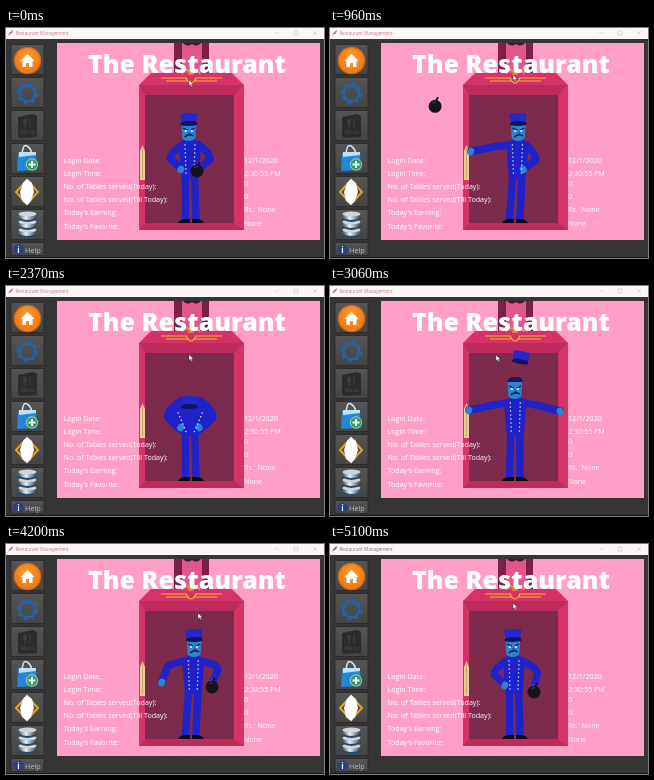
These frames come from a looping animation (318 px wide and 230 px high, 5130 ms). An HTML page:

```html
<!DOCTYPE html>
<html lang="en">
<head>
<meta charset="utf-8">
<title>Restaurant Management</title>
<style>
html, body { margin: 0; width: 100%; height: 100%; overflow: hidden; background: #353535; }
svg { display: block; width: 100vw; height: 100vh; }
text { font-family: "Open Sans", "Noto Sans", sans-serif; white-space: pre; }
.info { font-size: 7.15px; fill: #fff; }
.limb { fill: none; stroke: #1f22c9; stroke-linecap: round; stroke-linejoin: round; }
.dots { fill: none; stroke: #e9e6d2; stroke-width: 1.6; stroke-linecap: round; stroke-dasharray: 0 4; }
</style>
</head>
<body>
<svg viewBox="0 0 318 230" preserveAspectRatio="none">
  <defs>
    <clipPath id="panel"><rect x="51" y="15" width="263" height="197"/></clipPath>
    <linearGradient id="button" x2="0" y2="1"><stop stop-color="#555"/><stop offset="1" stop-color="#454545"/></linearGradient>
    <radialGradient id="orange" cy=".4"><stop stop-color="#ffa033"/><stop offset="1" stop-color="#f07c16"/></radialGradient>
    <linearGradient id="steel"><stop stop-color="#4c5258"/><stop offset=".4" stop-color="#eef0f1"/><stop offset="1" stop-color="#3c4248"/></linearGradient>
  </defs>
  <rect width="318" height="230" fill="#353535"/>
  <rect width="318" height="11" fill="#fdf6f6"/>
  <path d="M269 5h4M288 3h4v4h-4zM307 3l4 4M311 3l-4 4" fill="none" stroke="#cfbcbe" stroke-width=".6"/>
  <g id="caption">
    <path d="M2 8Q3 4 7 2Q7 6 3 7Z"/>
    <text x="9.5" y="7" font-size="4.6">Restaurant Management</text>
  </g>
  <g id="buttons" fill="url(#button)" stroke="#292929" stroke-width=".8"></g>

  <circle cx="21.5" cy="32.5" r="13.2" fill="url(#orange)" stroke="#c9691c" stroke-width="1.2"/>
  <path d="M14.5 33L21.5 26L28.5 33H26.5V39H23V35H20V39H16.500V33Z" fill="#fff"/>
  <g fill="none" stroke="#2364aa">
    <circle cx="21.5" cy="65.5" r="7.8" stroke-width="2.4"/>
    <circle cx="21.5" cy="65.5" r="9.8" stroke-width="2" stroke-dasharray="3.6 4.100"/>
  </g>
  <path d="M12 89L27 86L31 88V109L14 110L12 108Z" fill="#2b2b2b"/>
  <path d="M18 91v5m2-5v5m-1-5v9m5-9v8" stroke="#444" fill="none"/>
  <text x="14.500" y="106" font-size="5.4" fill="#4c4c4c">Menu</text>
  <path d="M16 127Q17 115 21 118Q25 120 26 127" fill="none" stroke="#d9e7f2" stroke-width="1.500"/>
  <path d="M12 125H30L31 142L11 143Z" fill="#2387d5"/>
  <path d="M13 124H30V127L13 129Z" fill="#c3e0f5"/>
  <circle cx="26" cy="136.500" r="5.700" fill="#2f9d56" stroke="#d9efe0" stroke-width=".7"/>
  <path d="M22.500 136.500h7m-3.500-3.500v7" stroke="#fff" stroke-width="2"/>
  <path d="M21 152L32 164L21 176L10 164Z" fill="none" stroke="#e2a52c" stroke-width="2"/>
  <path d="M21 151L26 155L28 164L25 173L21 177L16 173L14 164L17 155Z" fill="#fff"/>
  <g id="drums"></g>
  <circle cx="12.500" cy="221.500" r="5" fill="#253c9b"/>
  <text x="11.200" y="224.500" font-size="8" font-weight="700" fill="#fff">i</text>
  <text x="19" y="224.500" font-size="7.300" fill="#c2c2c2">Help</text>

  <g clip-path="url(#panel)">
    <rect x="51" y="15" width="263" height="197" fill="#ff9fc8"/>
    <path d="M175 14H197V46H175Z" fill="#e0588b"/>
    <path d="M168 14H176V46H168ZM196 14H203V46H196Z" fill="#7c2049"/>
    <path d="M176 14H196Q191 20 186 16Q181 20 176 14Z" fill="#3d1730"/>
    <path d="M145 45H226L238 57V202H133V57Z" fill="#d53268"/>
    <path d="M133 57H238L228 67H139Z" fill="#bd2b5c"/>
    <path d="M133 202L139 195H228L238 202Z" fill="#bd2b58"/>
    <rect x="139" y="67" width="89" height="128" fill="#7d2b4c"/>
    <path d="M155 50H181M189 50H216M160 53H181M189 53H211M176 46Q180 38 185 45Q190 38 194 46M180 50Q185 60 190 50M182 46H188" fill="none" stroke="#f1b52f" stroke-width="1.200"/>
    <path d="M134 152V123L136.500 117L139 123V152Z" fill="#e9cf91"/>
    <path d="M136.500 119V150" stroke="#b8945c" stroke-width=".7"/>

    <path id="legs" class="limb" stroke-width="7.500"/>
    <path d="M172 195Q174 191 180 191H184V195ZM186 195V191H190Q196 191 198 195Z" fill="#0b0a10"/>
    <path id="torso" fill="#1f22c9"/>
    <path id="arms" class="limb"/>
    <path id="hands" class="limb" style="stroke:#2e83d0" stroke-width="6.500"/>
    <path id="buttonRows" class="dots"/>
    <g id="head">
      <path d="M-7.500 -11H7.500L6.500 6Q4 9 0 9Q-5 9 -6.500 6Z" fill="#2e83d0"/>
      <path d="M-8 -8Q-7 -13 0 -13Q8 -13 8 -8Z" fill="#151a57"/>
      <path d="M-6 -4L-1 -2M2 -2L6 -4M-4 5Q0 1 5 4" fill="none" stroke="#101842" stroke-width="1.300"/>
      <path d="M-4 -1h2m4 0h2" stroke="#fff" stroke-width="1.400"/>
      <path d="M1 -1L-1 2H2" fill="#1c589d"/>
    </g>
    <g id="hat">
      <path d="M-8.500 -6Q0 -8 8.500 -6L7 4H-7Z" fill="#2227cf"/>
      <path d="M-7.500 2Q0 0 7.500 2L8.500 5Q0 7 -8.500 5Z" fill="#10145d"/>
    </g>
    <g id="ball"><circle r="6.500" fill="#17131b"/><path d="M1 -6L3 -9" stroke="#17131b" stroke-width="2"/><path d="M-3 -3Q-1 -5 1 -4" fill="none" stroke="#45404a"/></g>
    <text x="82" y="44.500" font-size="25" font-weight="800" fill="#fff">The Restaurant</text>
    <g id="labels"></g>
  </g>
  <path id="cursor" d="M0 0V6L1.500 4.700L2.600 7L3.600 6.500L2.600 4.300H4.400Z" fill="#fff" stroke="#333" stroke-width=".5"/>
  <path d="M0 229.500H318" stroke="#161616"/>
</svg>
<script>
const LOOP = 5130, STEP = 30, ARM = 18;
const el = id => document.getElementById(id);
const set = (id, name, value) => el(id).setAttribute(name, value);
const place = (id, x, y, rest = '') => set(id, 'transform', `translate(${x} ${y})${rest}`);

el('buttons').innerHTML = Array.from({ length: 7 }, (_, i) =>
  `<rect x="5" y="${16.5 + i * 33}" width="33" height="${i < 6 ? 30 : 13}"/>`).join('');
el('drums').innerHTML = [202, 194, 186].map(y =>
  `<path d="M12.500 ${y}v5q9 5 18 0v-5z" fill="url(#steel)"/><path d="M12.500 ${y + 4.5}q9 5 18 0" fill="none" stroke="#1d4a70" stroke-width="2"/>
   <ellipse cx="21.500" cy="${y}" rx="9" ry="2.500" fill="#cfd5da"/>`).join('');
el('labels').innerHTML = [
  ['Login Date:', '12/1/2020'], ['Login Time:', '2:30:55 PM'],
  ['No. of Tables served(Today):', '0'], ['No. of Tables served(Till Today):', '0'],
  ["Today's Earning:", 'Rs.  None'], ["Today's Favorite:", 'None']
].map(([label, value], i) => {
  const y = 135 + i * 13.1;
  return `<text class="info" x="57.500" y="${y}">${label}</text><text class="info" x="238" y="${y - (i > 1 ? 3 : 0)}">${value}</text>`;
}).join('');

const clamp = u => Math.min(1, Math.max(0, u));
const rise = (t, from, to) => { const u = clamp((t - from) / (to - from)); return u * u * (3 - 2 * u); };
const bump = (t, mid, half) => rise(t, mid - half, mid) - rise(t, mid, mid + half);
const mix = (a, b, u) => a.map((v, i) => v + (b[i] - v) * u);
const add = (base, ...moves) => moves.reduce(([x, y], [u, dx, dy]) => [x + u * dx, y + u * dy], base);

// Two equal arm segments, bent away from the body.
function elbow([sx, sy], [hx, hy], side) {
  const dx = hx - sx, dy = hy - sy, reach = Math.hypot(dx, dy);
  const bend = Math.sqrt(Math.max(0, ARM ** 2 - reach ** 2 / 4)) / reach;
  return [(sx + hx) / 2 + side * dy * bend, (sy + hy) / 2 - side * dx * bend];
}
const armPath = (shoulder, hand, side) => {
  const [x, y] = elbow(shoulder, hand, side);
  return `M${shoulder}Q${x + side} ${y - 1} ${mix([x, y], hand, .25)}L${hand}`;
};
const thrown = ([x, y], s) => [x - 190 * s, y - 270 * Math.abs(s) + 100 * s * s];

function gesture(t) {
  const point = rise(t, 450, 720) - rise(t, 1900, 2200);
  const toss = bump(t, 960, 500), spread = bump(t, 3060, 550);
  const lower = bump(t, 4200, 700), rest = rise(t, 3700, 4100);
  return {
    left: add([175, 141], [point, -28, -3], [toss, -6, -15], [spread, -36, -17], [lower, -19, -3]),
    right: add([193, 141], [spread, 37, -16], [rest, 11, 3], [lower, 2, -5])
  };
}

function ballAt(t, left, right) {
  const release = 760, caught = 3950, grip = [0, 4];
  if (t < release) return add(mix(right, left, rise(t, 450, release)), [1, -2 + 2 * rise(t, 450, release), 2]);
  if (t < 2400) return thrown(gesture(release).left, (t - release) / 1000);
  return add(thrown(right, Math.min(0, (t - caught) / 1000)), [1, ...grip]);
}

function draw(t) {
  const { left, right } = gesture(t);
  const bow = bump(t, 2370, 340);
  const x = 186 - 2 * Math.cos(4 * Math.PI * t / LOOP);
  const headX = 186 + (x - 186) * 1.6, headY = 104 + bow * 20;
  const wide = 11 + bow * 8, top = 112 + bow * 2;

  set('legs', 'd', `M${x - 4.5} 147L179.500 189M${x + 4.5} 147L190 189`);
  set('torso', 'd', `M${x - 5} ${top}Q${x - wide} ${top} ${x - wide} ${top + 7}L${x - 8.5} 150H${x + 8.5}L${x + wide} ${top + 7}Q${x + wide} ${top} ${x + 5} ${top}Z`);
  set('arms', 'd', armPath([x - 8, 117], left, -1) + armPath([x + 9, 117], right, 1));
  set('arms', 'stroke-width', 7.5 + bow * 5);
  set('hands', 'd', `M${left}l-.500 1M${right}l.500 1`);
  set('buttonRows', 'd', [-1, 1].map(side =>
    `M${x + side * (5 + bow * 7)} ${117 + bow * 10}L${x + side * 4} 146`).join(''));

  place('head', headX, headY);
  set('head', 'opacity', bow > .65 ? 0 : 1);
  const flight = Math.max(0, 1 - ((t - 3060) / 360) ** 2);
  place('hat', headX + flight * 6, headY - 12 - flight * 20 + bow * 5, ` rotate(${flight * 12 - 2})`);

  place('ball', ...ballAt(t, left, right));
  place('cursor', 183 - 17 * bump(t, 3060, 550) + 9 * bump(t, 4200, 600),
    52 - 7 * bump(t, 1350, 1200) + 17 * (rise(t, 1900, 2300) - rise(t, 4600, 5500)));
  set('caption', 'fill', t >= 4890 ? '#777' : '#bd7f87');
}

const start = performance.now();
function tick() {
  const t = (performance.now() - start) % LOOP;
  draw(Math.floor(t / STEP) * STEP);
  requestAnimationFrame(tick);
}
draw(0);
requestAnimationFrame(tick);
</script>
</body>
</html>
```
